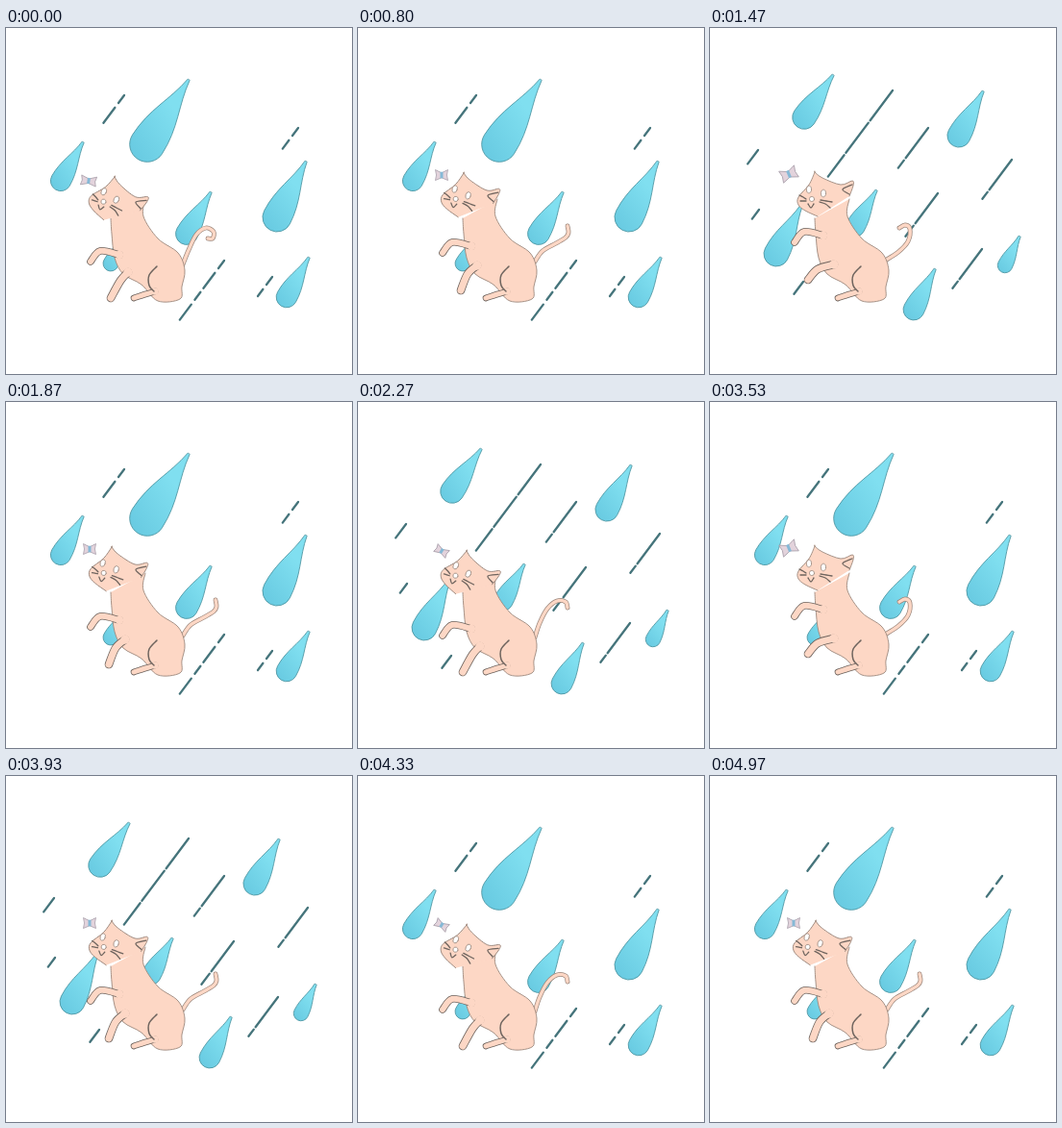
Write an HTML page with a canvas that moves like this. It is 360 px wide and 360 px high and loops after 5000 ms.

```html
<!DOCTYPE html>
<html>
<head>
<meta charset="utf-8">
<title>Cat in the rain</title>
<style>
html, body { margin: 0; height: 100%; overflow: hidden; background: #fff }
canvas { display: block; width: 100vw; height: 100vh }
</style>
</head>
<body>
<canvas width="360" height="360"></canvas>
<script>
const ctx = document.querySelector('canvas').getContext('2d');
const SKIN = '#fdd7c5', EDGE = '#9c887d', INK = '#6e645e';

// Drops: tip and belly.  Streaks: top end and length, all on one slant.
const heavy = {
  drops: ['190,54 147,121', '80,119 57,159', '213,171 188,214', '312,139 282,197', '315,239 292,280', '126,215 109,245'],
  streaks: [[123, 70, 38], [304, 104, 27], [227, 242, 82], [277, 259, 25]],
  dash: [10, 6, 20, 5]
};
const light = {
  drops: ['128,49 98,93', '284,66 259,112', '95,185 69,235', '173,169 151,207', '234,251 212,293', '322,217 307,247'],
  streaks: [[190, 65, 112], [227, 104, 52], [314, 137, 51], [237, 172, 56], [283, 230, 51], [50, 127, 18], [51, 189, 12], [97, 264, 16]],
  dash: [39, 3]
};
const rains = [heavy, heavy, light, light];

// The head turns about its left ear; the raised arm only shifts up.
const crouch = {
  head: [113, 155, 18], lift: 0, leg: '127,254 119,263 109,281',
  tail: '184,245 189,230 197,215 207,207 216,208 218,214', bug: [87, 155, 30, 14, 9]
};
const curl = { ...crouch, tail: '184,246 190,231 198,215 208,208 216,212 215,219 210,219', bug: [86, 159, 8, 16, 10] };
const stretch = {
  head: [110, 151, 11], lift: 9, leg: '124,247 114,256 107,273',
  tail: '184,243 192,232 206,224 216,218 219,213 218,206', bug: [87, 153, 0, 13, 11]
};
const sit = {
  head: [109, 150, 0], lift: 20, leg: '129,246 112,251 102,262',
  tail: '182,242 196,233 206,222 208,209 203,205 197,208', bug: [82, 152, -22, 17, 13]
};
const poses = [curl, crouch, stretch, sit];

const BODY = '145,178 143,196 158,219 179,234 186,252 183,269 181,282 158,284 141,267 122,256 113,239 110,214 109,198';
const HEAD = '3,46 -10,40 -17,34 -17,26 -6,13 0,0 0,0 8,6 27,13 39,9 40,14 36,25';
const FACE = ['36,23 29,18 39,13', '5,31 11,33 16,37', '6,29 12,30 18,31',
  '-16,24 -12,26 -9,28', '-15,30 -12,30 -9,30', '-7,33 -4,37 -1,33'];

const points = s => s.split(' ').map(p => p.split(',').map(Number));

// Smooth curve through the points; a doubled point makes a corner.
function trace(s) {
  const p = points(s), last = p.length - 1;
  const at = i => p[Math.max(0, Math.min(last, i))];
  ctx.beginPath();
  ctx.moveTo(...p[0]);
  for (let i = 0; i < last; i++) {
    const [a, b, c, d] = [at(i - 1), at(i), at(i + 1), at(i + 2)];
    ctx.bezierCurveTo(b[0] + (c[0] - a[0]) / 6, b[1] + (c[1] - a[1]) / 6,
      c[0] - (d[0] - b[0]) / 6, c[1] - (d[1] - b[1]) / 6, c[0], c[1]);
  }
}

function stroke(color, width) {
  ctx.strokeStyle = color;
  ctx.lineWidth = width;
  ctx.stroke();
}

function fill(color) {
  ctx.fillStyle = color;
  ctx.fill();
}

function placed(x, y, degrees, paint) {
  ctx.save();
  ctx.translate(x, y);
  ctx.rotate(degrees * Math.PI / 180);
  paint();
  ctx.restore();
}

function drop(ends) {
  const [[tx, ty], [x, y]] = points(ends);
  const L = Math.hypot(tx - x, ty - y), r = L * .23;
  placed(x, y, Math.atan2(tx - x, y - ty) * 180 / Math.PI, () => {
    ctx.beginPath();
    ctx.moveTo(1.2, -L);
    ctx.bezierCurveTo(r * .28, -L * .65, r, -L * .4, r, 0);
    ctx.arc(0, 0, r, 0, Math.PI);
    ctx.bezierCurveTo(-r, -L * .4, -r * .28, -L * .65, -1.2, -L);
    ctx.closePath();
    const shade = ctx.createLinearGradient(r, -L * .5, -r * .4, r);
    shade.addColorStop(0, '#80dff0');
    shade.addColorStop(1, '#68cae1');
    fill(shade);
    stroke('#4f97a3', .8);
  });
}

function rainfall({ drops, streaks, dash }) {
  drops.forEach(drop);
  ctx.beginPath();
  for (const [x, y, length] of streaks) {
    ctx.moveTo(x, y);
    ctx.lineTo(x - length * .6, y + length * .8);
  }
  ctx.setLineDash(dash);
  stroke('#45747b', 2.3);
  ctx.setLineDash([]);
}

// A round-ended limb whose first point melts into the body.
function limb(s, width) {
  trace(s);
  stroke(INK, width + 1.6);
  stroke(SKIN, width);
  ctx.beginPath();
  ctx.arc(...points(s)[0], width / 2 + 1.2, 0, 7);
  fill(SKIN);
}

function head() {
  trace(HEAD);
  fill(SKIN);
  stroke(EDGE, .9);
  for (const line of FACE) {
    trace(line);
    stroke(INK, 1.3);
  }
  points('-6,18 9,22 -3,28').forEach(([x, y], i) => {
    ctx.beginPath();
    ctx.ellipse(x, y, 2.6, i < 2 ? 3.8 : 2.6, .1, 0, 7);
    fill('#fff');
    stroke(EDGE, .8);
  });
}

function cat({ head: place, lift, leg, tail }) {
  trace(tail);
  stroke(EDGE, 4.8);
  stroke(SKIN, 3.3);
  trace(BODY);
  fill(SKIN);
  stroke(EDGE, .9);
  limb('155,274 145,277 133,281', 5);
  trace('157,248 149,257 149,268 154,274');
  stroke(INK, 1.5);
  placed(0, -lift, 0, () => limb('118,236 98,232 88,243', 6));
  limb(leg, 7);
  placed(...place, head);
}

function butterfly([x, y, angle, w, h]) {
  placed(x, y, angle, () => {
    for (const side of [-1, 1]) {
      ctx.beginPath();
      ctx.moveTo(0, -h * .2);
      ctx.lineTo(side * w / 2, -h / 2);
      ctx.lineTo(side * w * .42, 0);
      ctx.lineTo(side * w / 2, h / 2);
      ctx.lineTo(0, h * .25);
      fill('#e3d3dc');
      stroke('#a9a0ab', .8);
    }
    ctx.fillStyle = '#86b9d6';
    ctx.fillRect(-1.5, -h * .3, 3, h * .6);
  });
}

function draw(now) {
  // Shown at 30 ticks a second. Rain: four drawings of 200 ms.
  // Cat: the first drawing holds 160 ms, the next three 120 ms each.
  const tick = Math.floor(now % 5000 * .03 + .15) % 150;
  const catTime = (tick * 100 / 3 + .1) % 520;
  const pose = poses[Math.max(0, Math.floor((catTime - 40) / 120))];
  ctx.fillStyle = '#fff';
  ctx.fillRect(0, 0, 360, 360);
  ctx.lineCap = ctx.lineJoin = 'round';
  rainfall(rains[Math.floor(tick / 6) % 4]);
  cat(pose);
  butterfly(pose.bug);
}

const start = performance.now();
(function loop() {
  draw(performance.now() - start);
  requestAnimationFrame(loop);
})();
</script>
</body>
</html>
```
